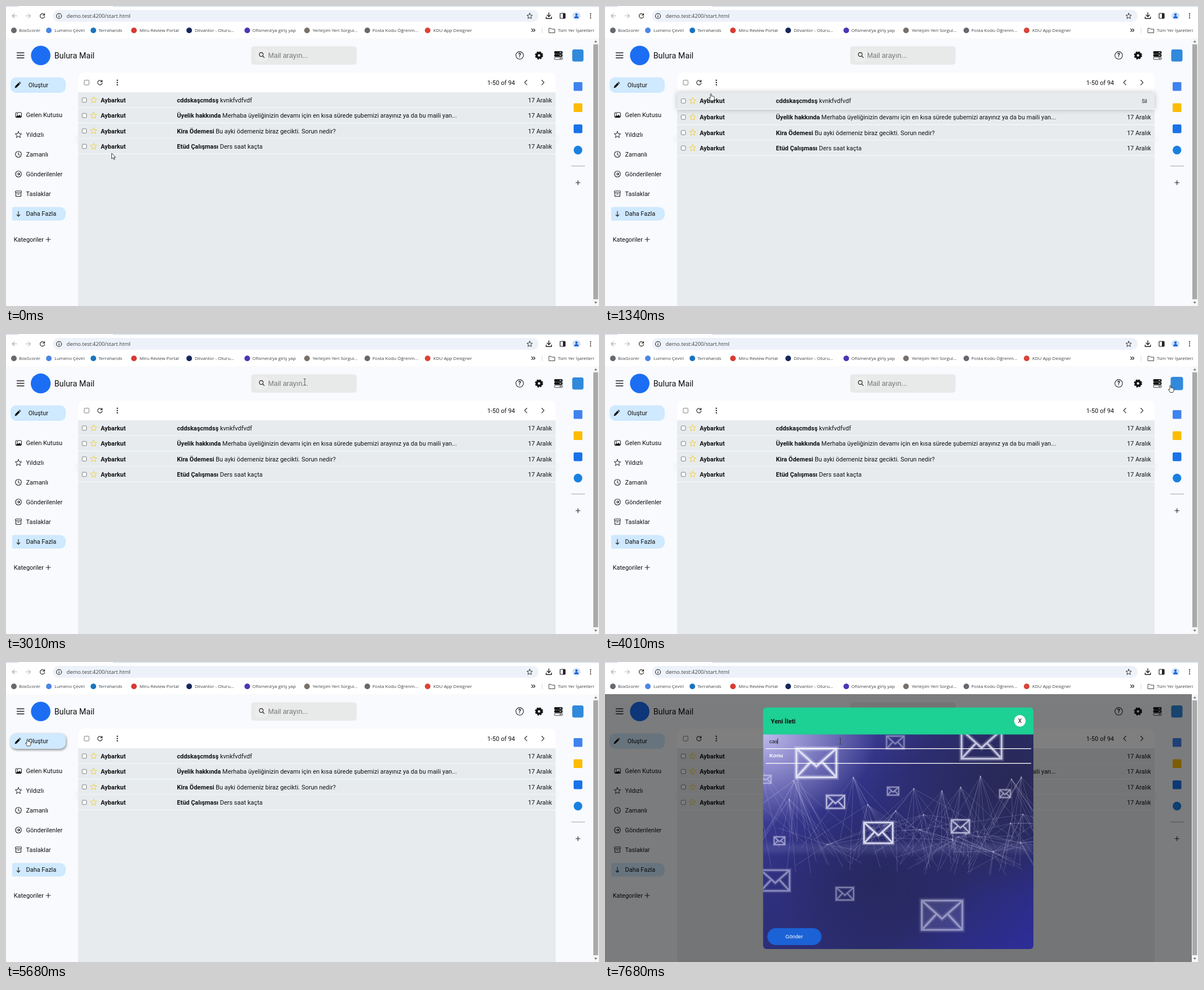
These frames come from a looping animation (1052 by 532 pixels, 8 s). An HTML page:

```html
<!DOCTYPE html>
<html lang="tr">
<head>
<meta charset="utf-8">
<title>Mail</title>
<style>
html, body { margin: 0; width: 100%; height: 100%; overflow: hidden; background: #f8fafd; }
svg { display: block; width: 100vw; height: 100vh; }
text { font-family: Roboto, Arial, sans-serif; font-size: 10.96px; fill: #111; white-space: pre; }
.ui { font-family: "Open Sans", "Noto Sans", sans-serif; fill: #3c4043; }
.form { font-family: "Liberation Sans", Arial, sans-serif; }
.b { font-weight: 700; }
.white { fill: #fff; }
.hint { fill: #757575; }
.ln { fill: none; stroke: #222; stroke-width: 1.1; stroke-linecap: round; stroke-linejoin: round; }
.hot { filter: drop-shadow(0 0 5px rgba(0,0,0,.24)); }
.lift { filter: drop-shadow(1px 2px 2px rgba(0,0,0,.45)); }
</style>
</head>
<body>
<svg id="stage" viewBox="0 0 1052 532" preserveAspectRatio="none"></svg>
<script>
const stage = document.getElementById('stage');
const $ = id => document.getElementById(id);

// drawing helpers
const text = (x, y, s, size = 10.96, attrs = '') =>
  `<text x="${x}" y="${(y + size * .36).toFixed(2)}" style="font-size:${size}px" ${attrs}>${s}</text>`;
const rect = (x, y, w, h, fill, r = 0, attrs = '') =>
  `<rect x="${x}" y="${y}" width="${w}" height="${h}" rx="${r}" fill="${fill}" ${attrs}/>`;
const disc = (x, y, r, fill, attrs = '') => `<circle cx="${x}" cy="${y}" r="${r}" fill="${fill}" ${attrs}/>`;
const line = (d, attrs = '') => `<path class="ln" d="${d}" ${attrs}/>`;
const ring = (x, y, r, attrs = '') => `<circle class="ln" cx="${x}" cy="${y}" r="${r}" ${attrs}/>`;
const dots = (x, y, gap, r) => [-gap, 0, gap].map(d => disc(x, y + d, r, '#222')).join('');
const star = (x, y, r, color) => {
  const pts = Array.from({ length: 10 }, (_, i) => {
    const a = -Math.PI / 2 + i * Math.PI / 5, k = i % 2 ? r * .45 : r;
    return (x + k * Math.cos(a)).toFixed(2) + ',' + (y + k * Math.sin(a)).toFixed(2);
  });
  return `<polygon class="ln" points="${pts.join(' ')}" style="stroke:${color};stroke-width:1"/>`;
};
const check = (x, y, s) => rect(x - s / 2, y - s / 2, s, s, '#fff', 1.3, 'stroke="#6f6f6f" stroke-width=".9"');
const reload = (x, y, r) =>
  line(`M${x + r * .8} ${y - r * .6}A${r} ${r} 0 1 0 ${x + r} ${y + r * .2}M${x + r} ${y - r - .3}v${r * .75}h${-r * .75}`);

function browser() {
  const marks = [
    [14, 23, '#66696d', 'BoxScorer'],
    [76, 86, '#4a86e8', 'Lumeno Çeviri'],
    [155, 164, '#1c74bd', 'Terrahands'],
    [227, 237, '#d93a32', 'Miru Review Portal'],
    [325, 335, '#14265c', 'Dilvantor - Oturu...'],
    [428, 437, '#4c36b5', 'Ofismera’ya giriş yap'],
    [534, 544, '#77706a', 'Yerleşim Yeri Sorgul...'],
    [641, 650, '#66696d', 'Posta Kodu Öğrenm...'],
    [748, 758, '#db4437', 'KDU App Designer']
  ];
  return rect(0, 0, 1052, 57, '#fff') + rect(0, 0, 1052, 1.6, '#d9e2ef') + rect(22, 0, 168, 2, '#fff') +
    rect(83, 7, 862, 21, '#edf2fa', 10.5) +
    line('M19 17.5h-8m3.7-3.7l-3.7 3.7 3.7 3.7', 'style="stroke:#a5a8ab"') +
    line('M35.5 17.5h8m-3.7-3.7l3.7 3.7-3.7 3.7', 'style="stroke:#b5b8bb"') +
    reload(64.5, 17.5, 4) +
    ring(94, 17.7, 4.5) + line('M94 17.4v2.6M94 15.4v.1') +
    text(107.5, 17.7, 'demo.test:4200/start.html', 9.3, 'class="ui"') +
    star(929, 18, 5.3, '#333') +
    line('M963 12v7m-3-3l3 3 3-3M958.3 19.5v2.7h9.4v-2.7', 'style="stroke-width:1.4"') +
    rect(983, 13, 9, 9, 'none', 1, 'stroke="#222" stroke-width="1.2"') + rect(988, 13, 4, 9, '#222') +
    disc(1012, 17.5, 7, '#cfe0fb') + disc(1012, 15.4, 2.1, '#0b57d0') +
    '<path d="M1008 21.5c0-4.6 8-4.6 8 0z" fill="#0b57d0"/>' + dots(1037, 17.5, 3.6, 1.1) +
    marks.map(([ix, tx, c, s]) => disc(ix, 43.3, 5, c) + text(tx, 43.2, s, 8, 'class="ui"')).join('') +
    line('M932.5 40.5l2.5 2.5-2.5 2.5M936 40.5l2.5 2.5-2.5 2.5') +
    rect(950.5, 38, 1, 10, '#cfd8e6') +
    line('M963.5 39.5h3.3l1.2 1.5h5.5v6.5h-10z', 'style="stroke:#444;stroke-width:1"') +
    text(979, 43.2, 'Tüm Yer İşaretleri', 7.9, 'class="ui"');
}

function sidebar() {
  const items = ['Gelen Kutusu', 'Yıldızlı', 'Zamanlı', 'Gönderilenler', 'Taslaklar'];
  return rect(8, 126.5, 98, 27.5, '#cfe9fe', 10, 'id="create"') +
    '<path d="M15.5 145.5l1-3.6 5.800-5.900 2.500 2.500-5.800 5.900zM23 135.2l1-1 2.500 2.500-1 1z" fill="#111"/>' +
    text(39.7, 140.5, 'Oluştur') +
    items.map((s, i) => text(35.5, 193.3 + i * 35, s)).join('') +
    rect(17, 189, 10.5, 8.5, '#fff', 1.2, 'stroke="#111" stroke-width="1"') +
    '<path d="M17.5 197l2.8-3.8 2 1.8 2.2-2.5 2.7 4.5z" fill="#111"/>' + disc(20, 191.5, 1, '#111') +
    star(22, 228.5, 6, '#222') +
    ring(22, 263, 5.3) + line('M22 260v3.4l2.2 1.4') +
    ring(22, 298, 5.3) + line('M19.3 298h5.2m-2-2l2 2-2 2') +
    rect(16.5, 328, 11, 3, 'none', .6, 'stroke="#222"') + line('M17.5 331v6.5h9v-6.5M20.5 333.5h3') +
    '<path d="M13 356.5h81q12 0 12 12t-12 12h-81q-2 0-2-2v-20q0-2 2-2z" fill="#cfe9fe"/>' +
    line('M22 364v9m-2.8-2.8l2.8 2.8 2.8-2.8') + text(35.5, 368.5, 'Daha Fazla') +
    text(13.7, 414.3, 'Kategoriler') + line('M75 410v8m-4-4h8');
}

function header() {
  const server = [80.5, 85.7, 90.9].map((y, i) =>
    rect(973, y, 14, 3.9, i < 2 ? '#111' : '#fff', 1, 'stroke="#111" stroke-width=".8"') +
    rect(982, y + 1.4, 3.4, 1, i < 2 ? '#fff' : '#111')).join('');
  return line('M19.5 83h12.5m-12.5 4.5h12.5m-12.5 4.5h12.5', 'style="stroke-width:1.3"') +
    disc(61.6, 87.7, 17.3, '#1b6ef3', 'id="logo"') + text(85.7, 87.6, 'Bulura Mail', 14.3) +
    rect(435, 71.5, 187, 32.5, '#e8e9e9', 5) + rect(442, 76, 23, 23, '#ededed', 8) +
    ring(452.8, 86, 3.4) + line('M455.3 88.6l2.8 2.9') +
    text(465, 87.3, 'Mail arayın...', 12.4, 'class="form hint"') +
    ring(911.3, 87.6, 6.7) + text(911.3, 87.8, '?', 10, 'text-anchor="middle" class="b"') +
    ring(945.6, 87.6, 4.1, 'style="stroke:#111;stroke-width:3.8"') +
    ring(945.6, 87.6, 6.2, 'style="stroke:#111;stroke-width:2;stroke-linecap:butt" stroke-dasharray="2.87 2"') +
    server + rect(1004.5, 77, 20, 21.5, '#3189dc', 3.5, 'id="avatar"') +
    rect(1007, 135, 15.5, 15.5, '#3f83ee', 1.5) + rect(1007, 172.5, 15.5, 15.5, '#fbbc04', 1.5) +
    rect(1007, 210, 15.5, 15.5, '#1a73e8', 2) + disc(1014.7, 255.5, 7.7, '#1a80e0') +
    rect(1003, 283.3, 24, 1, '#a0a3a6') + line('M1014.7 309.5v7.5m-3.7-3.7h7.5');
}

const mails = [
  ['cddskaşcmdsş', 'kvnkfvdfvdf'],
  ['Üyelik hakkında', 'Merhaba üyeliğinizin devamı için en kısa sürede şubemizi arayınız ya da bu maili yan...'],
  ['Kira Ödemesi', 'Bu ayki ödemeniz biraz gecikti. Sorun nedir?'],
  ['Etüd Çalışması', 'Ders saat kaçta']
];
const rowH = 27.35, grow = 3;

const mailRow = ([subject, body], i) => `<g id="row${i}">
  <rect x="128" width="847" height="${rowH}" fill="#e7ebee"/><path d="M128 0h847" stroke="#fbfcfd"/>
  <g>${check(139, 13.6, 7.6)}${star(155.5, 13.6, 6, '#f6cf3a')}${text(168, 13.6, 'Aybarkut', 10.96, 'class="b"')}
  ${text(303.3, 13.6, `<tspan class="b">${subject}</tspan> ${body}`)}
  ${text(968.5, 13.6, '17 Aralık', 10.96, 'text-anchor="end"')}
  ${text(957, 13.6, 'Sil', 8.8, 'text-anchor="middle"')}</g></g>`;

function inbox() {
  return rect(122, 230, 859, 11, '#000', 5, 'opacity=".035" filter="url(#soft)"') +
    '<path d="M128 532V127q0-9 9-9h829q9 0 9 9v405z" fill="#e7ebee"/>' +
    '<path d="M128 153.3V127q0-9 9-9h829q9 0 9 9v26.3z" fill="#fff"/>' +
    check(143, 135.8, 8.4) + reload(166.6, 135.8, 4) + dots(197.5, 135.8, 4, 1.2) +
    text(853.7, 135.8, '1-50 of 94') +
    line('M924 131.5l-4 4.2 4 4.2M950.5 131.5l4 4.2-4 4.2') +
    `<g id="rows">${mails.map(mailRow).join('')}</g>`;
}

function envelope([x, y, w, o]) {
  const h = w * .72, l = x - w / 2, t = y - h / 2;
  const d = `M${l} ${t}h${w}v${h}h${-w}zl${w / 2} ${h * .62} ${w / 2} ${-h * .62}` +
    `M${l} ${t + h}l${w * .36} ${-h * .54}M${l + w} ${t + h}l${-w * .36} ${-h * .54}`;
  const stroke = (width, alpha) =>
    `<path d="${d}" fill="none" stroke="#e6e6fa" stroke-width="${width}" opacity="${alpha}"/>`;
  return stroke(3 + w / 12, o * .25) + stroke(1 + w / 28, o);
}

// seeded fans of faint threads behind the envelopes
function web() {
  let seed = 11, d = '', knots = '';
  const rnd = () => (seed = seed * 16807 % 2147483647) / 2147483647;
  for (let hub = 0; hub < 24; hub++) {
    const x = 275 + rnd() * 490, y = 185 + rnd() * 155;
    knots += disc(x.toFixed(1), y.toFixed(1), 1.3, '#e0e0f6', 'opacity=".5"');
    for (let i = 0; i < 9; i++)
      d += `M${x.toFixed(1)} ${y.toFixed(1)}l${(rnd() * 220 - 110).toFixed(1)} ${(340 - y + rnd() * 100 - 60).toFixed(1)}`;
  }
  return `<path d="${d}" stroke="#d2d2ee" stroke-width=".8" opacity=".27" fill="none"/>` + knots;
}

function dialog() {
  const letters = [
    [375, 179, 71, .9], [668, 146, 71, .75], [515, 142.5, 31, .4], [409, 248, 32, .7], [511, 229, 20, .5],
    [709.5, 233.5, 19, .55], [485, 303, 51, .9], [630.5, 291.5, 32, .7], [309.5, 317, 19, .55], [285, 208, 19, .5],
    [302, 387.5, 51, .45], [425.5, 411, 31, .4], [598, 449, 72, .45]
  ];
  return `<g id="dialog">${rect(0, 57, 1041, 475, '#000', 0, 'opacity=".5"')}
    <g clip-path="url(#card)">
    ${['night', 'glow', 'dusk', 'shade'].map(id => rect(280, 128, 480, 381, `url(#${id})`)).join('')}
    ${web()}${rect(280, 322, 480, 16, '#b9bbea', 0, 'opacity=".15" filter="url(#soft)"')}
    ${rect(562, 423, 72, 52, '#bcbcf0', 0, 'opacity=".16" filter="url(#soft)"')}
    ${letters.map(envelope).join('')}${rect(280, 80, 480, 48.5, '#1dd093')}</g>
    ${text(294, 105, 'Yeni İleti', 11.3, 'class="b"')}
    ${disc(736, 104.4, 10.3, '#fafafa')}${text(736, 104.4, 'X', 10.5, 'text-anchor="middle"')}
    ${text(291.5, 140.3, '', 9.5, 'id="to"')}${text(291.5, 166, 'Konu', 9.5, 'class="form b white"')}
    <path id="caret" d="M0 135.5v10" stroke="#111" stroke-width=".9"/>
    ${rect(285, 153, 471, 1.3, '#fff')}${rect(285, 179, 471, 1.3, '#fff')}
    ${rect(288, 472, 96, 30, '#1b62d6', 15)}${text(335.6, 487, 'Gönder', 9.3, 'class="form white" text-anchor="middle"')}
  </g>`;
}

const cursors = `<g id="cursor">
  <path id="arrow" d="M0 0V10L2.3 7.9 3.9 11.4 5.4 10.7 3.9 7.3H7Z" fill="#fff" stroke="#111" stroke-width=".8"/>
  <path id="hand" d="M-1 .8q1-1.4 2 0V4.5q1.2-.7 1.9.2 1.2-.5 1.7.4 1.4-.2 1.4 1V8.5q0 2-1.4 4H-.5Q-1.5 10-3.6 7.6q.2-1.6 2.6.3Z" fill="#fff" stroke="#111" stroke-width=".8"/>
  <path id="beam" d="M-2-5.5h1.5l.5.6.5-.6H2M0-5V5M-2 5.5h1.5l.5-.6.5.6H2" fill="none" stroke="#333" stroke-width=".8"/>
</g>`;

const fade = (id, cx, cy, r, color, alpha) => `<radialGradient id="${id}" cx="${cx}" cy="${cy}" r="${r}">
  <stop offset="0" stop-color="${color}" stop-opacity="${alpha}"/><stop offset="1" stop-color="${color}" stop-opacity="0"/></radialGradient>`;

stage.innerHTML = `<defs>
  <filter id="soft" x="-20%" y="-150%" width="140%" height="400%"><feGaussianBlur stdDeviation="5"/></filter>
  <clipPath id="card"><rect x="280.5" y="80.7" width="479.5" height="428.3" rx="6"/></clipPath>
  <linearGradient id="night" x1="0" y1="0" x2="1" y2="1"><stop offset="0" stop-color="#4645a6"/><stop offset=".35" stop-color="#2f3080"/>
    <stop offset=".7" stop-color="#2b2c6c"/><stop offset="1" stop-color="#2d2d9a"/></linearGradient>
  ${fade('glow', 0, 0, .42, '#c3c0ee', .95)}${fade('dusk', .92, .2, .55, '#27284f', .85)}${fade('shade', .42, .68, .38, '#25275a', .85)}
</defs>` + rect(0, 57, 1052, 475, '#f8fafd') + header() + sidebar() + inbox() + dialog() + browser() +
  rect(1041, 57, 11, 475, '#f7f7f7') + rect(1042, 68, 8.5, 452, '#a9a9a9') +
  '<path d="M1043.5 64.5l2.7-3.5 2.7 3.5zM1043.5 524.5l2.7 3.5 2.7-3.5z" fill="#777"/>' + cursors;

// time, pointer x, y, shape, extra state
const steps = [
  [0, 187.5, 261, 'arrow'],
  [330, 188, 253, 'hand', { row: 3 }],
  [670, 188, 242, 'hand', { row: 3 }],
  [1000, 188, 216, 'hand', { row: 2 }],
  [1340, 188, 155.5, 'hand', { row: 0 }],
  [1670, 166, 97, 'arrow'],
  [2000, 88.5, 78, 'arrow'],
  [2340, 65, 88, 'arrow', { logo: 1.18 }],
  [2670, 60, 88, 'arrow', { logo: 1.23 }],
  [3010, 530, 85, 'beam', { logo: 1.02 }],
  [3340, 811.5, 104, 'arrow'],
  [3670, 1035, 91, 'arrow'],
  [4010, 1003, 91, 'hand', { avatar: 1.1 }],
  [4340, 1012, 93, 'hand', { avatar: 1.14 }],
  [4680, 921.5, 98, 'arrow', { avatar: 1.04 }],
  [5010, 266.5, 116, 'arrow'],
  [5340, 18, 142, 'hand'],
  [5680, 38, 136.5, 'hand', { lift: true }],
  [6010, 37.5, 137, 'arrow', { lift: true, open: true }],
  [6350, 232, 150, 'arrow', { open: true }],
  [6680, 392, 142, 'beam', { open: true }],
  [7010, 417.5, 140.5, 'beam', { open: true, typed: '' }],
  [7350, 417.5, 140.5, 'beam', { open: true, typed: 'c' }],
  [7680, 417.5, 140.5, 'beam', { open: true, typed: 'cas' }]
];

const show = (node, on) => node.setAttribute('visibility', on ? 'visible' : 'hidden');
const move = (node, x, y) => node.setAttribute('transform', `translate(${x} ${y})`);
const zoom = (node, x, y, k) => node.setAttribute('transform', `translate(${x} ${y}) scale(${k}) translate(${-x} ${-y})`);
const rows = mails.map((_, i) => $('row' + i));

function poseRows(hovered) {
  let top = 153.3;
  rows.forEach((row, i) => {
    const hot = hovered === i, h = rowH + (hot ? grow : 0);
    const [back, rule, content] = row.children;
    const [date, del] = [...content.children].slice(-2);
    move(row, 0, top);
    move(rule, 0, h - .5);
    move(content, 0, hot ? grow / 2 : 0);
    back.setAttribute('height', h);
    back.setAttribute('class', hot ? 'hot' : '');
    show(date, !hot);
    show(del, hot);
    top += h;
  });
  $('rows').append(...rows);
  if (hovered !== undefined) $('rows').append(rows[hovered]);
}

function poseDialog({ open, typed }) {
  const to = $('to'), caret = $('caret');
  $('dialog').style.display = open ? '' : 'none';
  caret.style.display = typed === undefined ? 'none' : '';
  to.textContent = typed || 'Kime';
  to.setAttribute('class', typed ? 'form' : 'form b white');
  if (open) move(caret, 291.5 + (typed ? to.getComputedTextLength() : 0), 0);
}

function pose([, x, y, shape, state = {}]) {
  poseRows(state.row);
  poseDialog(state);
  zoom($('logo'), 61.6, 87.7, state.logo || 1);
  zoom($('avatar'), 1014.5, 87.8, state.avatar || 1);
  $('create').setAttribute('class', state.lift ? 'lift' : '');
  move($('cursor'), x, y);
  for (const id of ['arrow', 'hand', 'beam']) show($(id), id === shape);
}

const start = performance.now();
let last;
function tick() {
  const t = (performance.now() - start) % 8000;
  const step = steps.findLast(s => s[0] <= t);
  if (step !== last) pose(last = step);
  requestAnimationFrame(tick);
}
tick();
</script>
</body>
</html>
```
